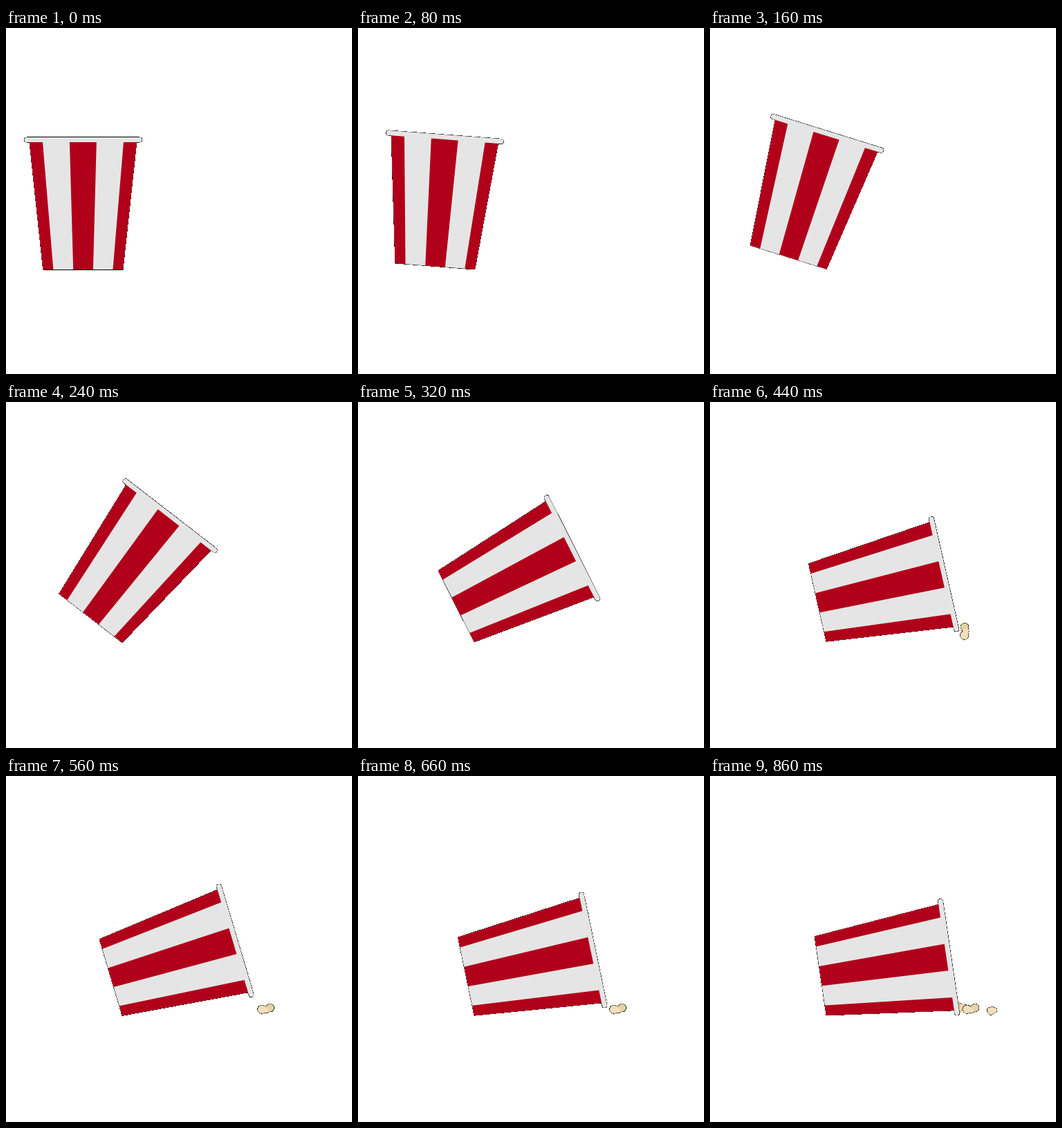
An HTML page with a canvas for the animation above (6020 ms loop, 500x500 px).

```html
<!DOCTYPE html>
<html lang="en">
<head>
<meta charset="utf-8">
<title>Popcorn spill</title>
<style>
html, body { margin: 0; width: 100%; height: 100%; overflow: hidden; background: #fff; }
canvas { display: block; width: 500px; height: 500px; }
</style>
</head>
<body>
<canvas id="stage" width="500" height="500"></canvas>
<script>
const ctx = document.getElementById('stage').getContext('2d', { willReadFrequently: true });
const LOOP = 6020, STEP = 20, END = 860, SIZE = 500;
const RED = '#b1001a', PALE = '#e5e5e5', INK = '#000';
const LIGHT = '#f0dfba', TAN = '#e5d2a3', PEACH = '#ecd2a6';
const PIVOT = { x: 170.2, y: 346.9 };
const REST = 81.6;

const clamp01 = v => Math.max(0, Math.min(1, v));
const lerp = (a, b, p) => a + (b - a) * p;
const progress = (t, from, to) => clamp01((t - from) / (to - from));
const easeOut = p => 1 - (1 - p) * (1 - p);

// Parabolic rebound between two impacts.
function hop(t, from, to, height) {
  const p = progress(t, from, to);
  return 4 * height * p * (1 - p);
}

// Cup tilt in degrees: topple, hit the floor, bounce twice.
function tiltAt(t) {
  if (t < 160) return 17.3 * (t / 160) ** 2;
  const s = t - 160;
  const fall = 17.3 + 0.2225 * s + 0.000406 * s * s;
  return Math.min(REST, fall) - hop(t, 393, 695, 8.3) - hop(t, 695, 785, 0.4);
}

function band(x1, x2, x3, x4, color, top = 165) {
  ctx.beginPath();
  ctx.moveTo(x1, top);
  ctx.lineTo(x2, top);
  ctx.lineTo(x3, 348.9);
  ctx.lineTo(x4, 348.9);
  ctx.closePath();
  ctx.fillStyle = color;
  ctx.fill();
}

function drawCup(tilt) {
  ctx.save();
  ctx.translate(PIVOT.x, PIVOT.y);
  ctx.rotate(tilt * Math.PI / 180);
  ctx.translate(-PIVOT.x, -PIVOT.y);

  ctx.strokeStyle = INK;
  ctx.lineWidth = 1.1;
  band(33.9, 188.9, 169, 53.6, PALE, 164);
  ctx.stroke();
  ctx.beginPath();
  ctx.roundRect(26.5, 158, 170, 7, 3.5);
  ctx.stroke();
  ctx.fillStyle = PALE;
  ctx.fill();

  band(33.9, 188.9, 169, 53.6, PALE, 164);
  band(33.9, 53, 68.4, 53.6, RED);
  band(91.9, 130.8, 125.9, 97.2, RED);
  band(169.9, 188.9, 169, 154.4, RED);
  ctx.restore();
}

// Each blob is [x, y, radius, colour].
function drawKernel(x, y, turn, blobs) {
  ctx.save();
  ctx.translate(x, y);
  ctx.rotate(turn * Math.PI / 180);
  ctx.strokeStyle = INK;
  ctx.lineWidth = 1.2;
  const dot = ([bx, by, r]) => {
    ctx.beginPath();
    ctx.arc(bx, by, r, 0, 7);
  };
  blobs.forEach(b => { dot(b); ctx.stroke(); });
  blobs.forEach(b => { dot(b); ctx.fillStyle = b[3]; ctx.fill(); });
  ctx.restore();
}

const BIG = [[6, -1, 5.7, TAN], [2, 1.5, 4.3, TAN], [-0.5, 2, 4.5, LIGHT], [-5.7, 1.2, 6, LIGHT]];
const SMALL = [[3.8, -0.5, 3.4, LIGHT], [-1.6, 1.2, 4.9, LIGHT], [-3.4, -1, 3.4, LIGHT], [0.5, -2, 3.4, LIGHT]];
const BACK = [[4, -1, 5, PEACH], [-3, 1.5, 5.5, PEACH], [0, -2, 4.5, PEACH]];

function drawPopcorn(t) {
  if (t >= 680) {
    const p = easeOut(progress(t, 680, 840));
    drawKernel(lerp(346, 362, p), lerp(332, 335, p), lerp(-60, 0, p), BACK);
    const q = progress(t, 680, 860);
    drawKernel(lerp(346, 407.5, easeOut(q)), lerp(327, 339, q * q) - hop(t, 680, 860, 3),
      lerp(-200, 0, q), SMALL);
  }
  if (t >= 360) {
    const p = easeOut(progress(t, 360, 540));
    const nudge = 1.5 * progress(t, 700, 820);
    const turn = lerp(-170, -78, progress(t, 360, 440)) + 78 * progress(t, 440, 560);
    drawKernel(lerp(350, 375.5, p) + nudge, lerp(321, 336, p), turn, BIG);
  }
}

// Every pixel becomes fully opaque or fully clear, which gives crisp, stippled edges.
function hardenEdges() {
  const image = ctx.getImageData(0, 0, SIZE, SIZE);
  const px = image.data;
  for (let i = 3; i < px.length; i += 4) px[i] = px[i] < 128 ? 0 : 255;
  ctx.putImageData(image, 0, 0);
}

function draw(t) {
  ctx.clearRect(0, 0, SIZE, SIZE);
  drawPopcorn(t);
  drawCup(tiltAt(t));
  hardenEdges();
}

const start = performance.now();
function tick(now) {
  const t = Math.max(0, now - start) % LOOP;
  draw(Math.min(END, Math.floor(t / STEP) * STEP));
  requestAnimationFrame(tick);
}
draw(0);
requestAnimationFrame(tick);
</script>
</body>
</html>
```
